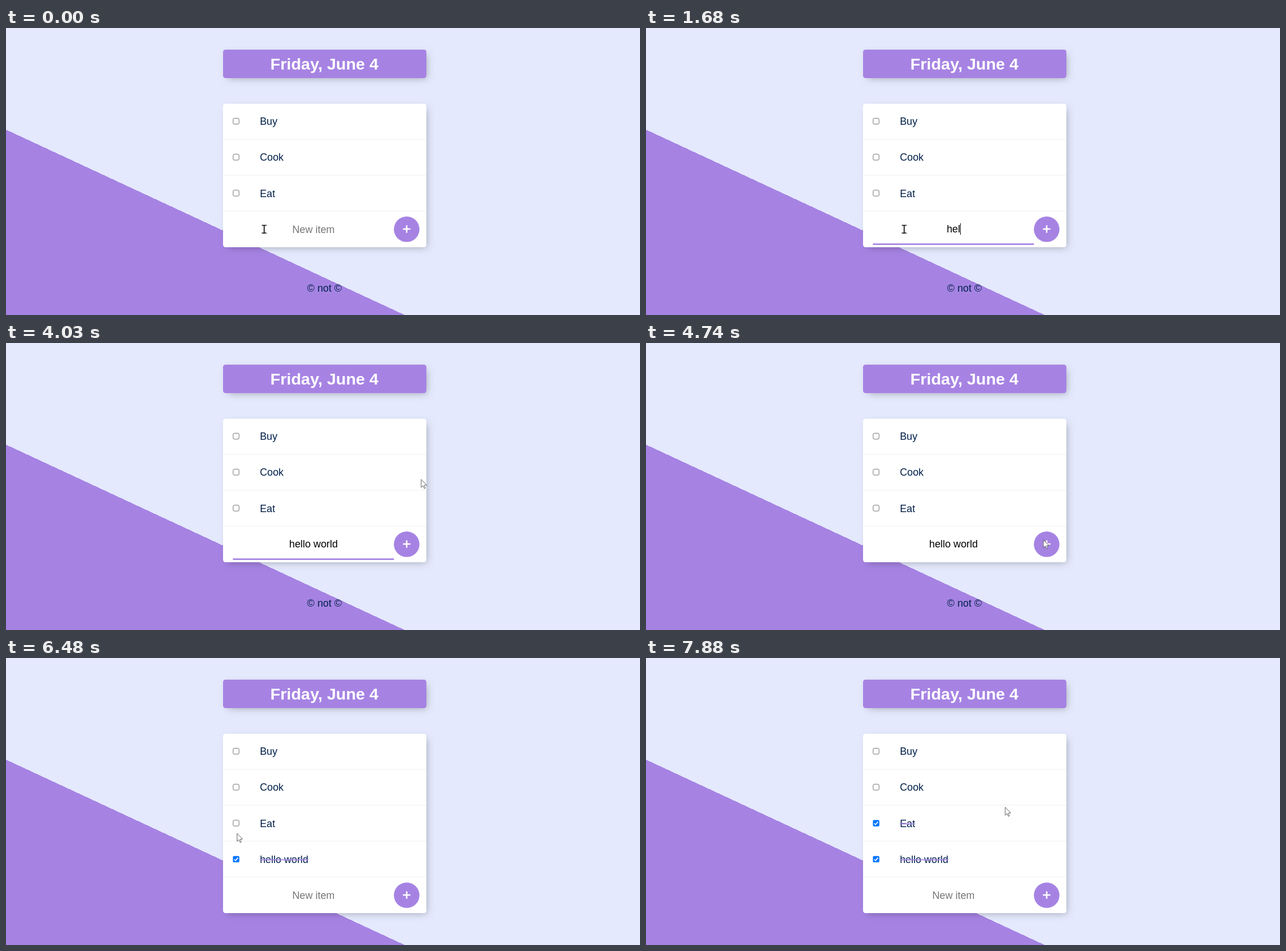
Animation, 1110 px wide and 504 px high, one loop 8.47 s. Source, as an HTML page with a canvas:

```html
<!DOCTYPE html>
<html lang="en">
<head>
<meta charset="utf-8">
<title>To-do list</title>
<style>
html, body { margin: 0; width: 100%; height: 100%; overflow: hidden; background: #e4e9fd; }
canvas { display: block; }
</style>
</head>
<body>
<canvas id="stage" width="1110" height="504"></canvas>
<script>
const ctx = document.getElementById('stage').getContext('2d');
const LOOP = 8470;
const PURPLE = '#a683e3', PALE = '#e4e9fd', NAVY = '#00204a';
const FONT = '"Liberation Sans", Arial, sans-serif';
const BOX = { x: 380, w: 356, top: 133 };
const INPUT_X = 538.3;

// Mouse button: pressed from `down` until `up`.
const CLICK = {
  input: { down: 460, up: 600 },
  add: { down: 4660, up: 4740 },
  hello: { down: 6140, up: 6300 },
  eat: { down: 6960, up: 7080 }
};
const SUBMIT = CLICK.add.up + 120;
const PHRASE = 'hello world';
const BURSTS = [
  { start: 1410, gap: 135, count: 3 },
  { start: 2270, gap: 145, count: 8 }
];
const ITEMS = [
  { text: 'Buy', done: Infinity },
  { text: 'Cook', done: Infinity },
  { text: 'Eat', done: CLICK.eat.up },
  { text: PHRASE, done: CLICK.hello.up }
];

// Each move eases out from the previous stop along a curve bent towards `via`.
const REST = [452, 353];
const MOVES = [
  { start: 3790, end: 4510, via: [855, 127], to: [695.5, 345] },
  { start: 4870, end: 5420, via: [570, 140], to: [460.5, 273.5] },
  { start: 5420, end: 5750, via: [430, 270], to: [403, 348] },
  { start: 6300, end: 6710, via: [408, 318.5], to: [401, 289] },
  { start: 7410, end: 7880, via: [520, 186], to: [628.5, 261.5] }
];

const baseline = i => Math.round(170.25 + 63.15 * i);
const rowY = i => 163.8 + 63.15 * i;

function pointerAt(t) {
  const n = MOVES.findLastIndex(m => t >= m.start);
  if (n < 0) return { x: REST[0], y: REST[1] };
  const { start, end, via, to } = MOVES[n];
  const from = n ? MOVES[n - 1].to : REST;
  const rest = (1 - Math.min(1, (t - start) / (end - start))) ** 2;
  const u = 1 - rest;
  const axis = k => rest * rest * from[k] + 2 * u * rest * via[k] + u * u * to[k];
  return { x: axis(0), y: axis(1) };
}

function typing(t) {
  let count = 0, last = CLICK.input.up;
  for (const b of BURSTS) {
    if (t < b.start) break;
    const n = Math.min(b.count, 1 + Math.floor((t - b.start) / b.gap));
    count += n;
    last = b.start + (n - 1) * b.gap;
  }
  return { text: t < SUBMIT ? PHRASE.slice(0, count) : '', caret: (t - last) % 1000 < 500 };
}

function rounded(x, y, w, h, r) {
  ctx.beginPath();
  ctx.roundRect(x, y, w, h, r);
}

function disc(x, y, r, color) {
  ctx.fillStyle = color;
  ctx.beginPath();
  ctx.arc(x, y, r, 0, 2 * Math.PI);
  ctx.fill();
}

function rect(x, y, w, h, color) {
  ctx.fillStyle = color;
  ctx.fillRect(x, y, w, h);
}

function polyline(points) {
  ctx.beginPath();
  points.forEach(([x, y]) => ctx.lineTo(x, y));
}

function label(text, x, y, color, align = 'left', size = 17.8, weight = 'normal') {
  ctx.font = `${weight} ${size}px ${FONT}`;
  ctx.textAlign = align;
  ctx.fillStyle = color;
  ctx.fillText(text, x, y);
}

function panel(y, h, color) {
  const inset = 4.45;
  ctx.save();
  ctx.shadowColor = 'rgba(0,0,0,0.3)';
  ctx.shadowBlur = 13.35;
  ctx.shadowOffsetX = ctx.shadowOffsetY = inset;
  ctx.fillStyle = '#000';
  rounded(BOX.x + inset, y + inset, BOX.w - 2 * inset, h - 2 * inset, 1);
  ctx.fill();
  ctx.restore();
  ctx.fillStyle = color;
  rounded(BOX.x, y, BOX.w, h, inset);
  ctx.fill();
}

function background() {
  // Hard diagonal edge through (0, 178.5), falling at 25 degrees.
  const angle = 65 * Math.PI / 180;
  const nx = 700 * Math.cos(angle), ny = -700 * Math.sin(angle);
  const fill = ctx.createLinearGradient(-nx, 178.5 - ny, nx, 178.5 + ny);
  fill.addColorStop(0.5, PURPLE);
  fill.addColorStop(0.5, PALE);
  rect(0, 0, 1110, 504, fill);
}

function checkbox(y, checked, hover) {
  const x = 397.3, top = y - 5.6;
  if (!checked) {
    ctx.strokeStyle = hover ? '#4f4f4f' : '#767676';
    ctx.lineWidth = 1;
    rounded(x + 0.4, top + 0.3, 10.3, 10.3, 2);
    ctx.stroke();
    return;
  }
  ctx.fillStyle = hover ? '#005cc8' : '#0075ff';
  rounded(x, top, 11.2, 11.2, 1.9);
  ctx.fill();
  ctx.strokeStyle = '#fff';
  ctx.lineWidth = 1.6;
  polyline([[x + 2.2, top + 5.8], [x + 4.5, top + 8.1], [x + 9, top + 3]]);
  ctx.stroke();
}

function item({ text, done }, i, t, pointer) {
  const y = rowY(i), base = baseline(i);
  const hover = Math.hypot(pointer.x - 403, pointer.y - y) < 7;
  checkbox(y, t >= done, hover);
  label(text, 444.4, base, NAVY);
  if (t >= done + 60) rect(444.4, base - 6.6, ctx.measureText(text).width, 1.8, PURPLE);
  rect(BOX.x, Math.floor(195.3 + i * 63.2), BOX.w, 1, '#f1f1f1');
}

function entry(i, t) {
  const { text, caret } = typing(t);
  const base = baseline(i) - (text ? 1 : 0);
  label(text || 'New item', INPUT_X, base, text ? '#000' : '#757575', 'center');
  if (t >= CLICK.input.up && t < CLICK.add.up) {
    rect(397.3, 378.3, 281.9, 2.7, PURPLE);
    if (caret) rect(Math.floor(INPUT_X + ctx.measureText(text).width / 2), base - 16, 1, 20, '#000');
  }
  const y = rowY(i) + 0.2;
  disc(701.5, y, 22.4, PURPLE);
  rect(695, y - 1.7, 13, 2.5, '#fff');
  rect(700.25, y - 6.9, 2.5, 13, '#fff');
}

function drawPointer({ x, y }, pressed) {
  if (pressed) disc(x, y, 11, 'rgba(255,255,0,0.47)');
  ctx.save();
  ctx.translate(x, y);
  const overInput = y > 326 && x > 420 && x < 679;
  if (overInput) {
    rect(-0.8, -7, 1.6, 14.5, '#000');
    rect(-4.2, -7.2, 8.4, 1.4, '#000');
    rect(-4.2, 6.4, 8.4, 1.4, '#000');
  } else {
    polyline([[0.4, 0.6], [0.4, 14.6], [3.6, 11.6], [5.8, 16.6], [7.8, 15.7], [5.7, 10.9], [10, 10.7]]);
    ctx.closePath();
    ctx.fillStyle = '#fff';
    ctx.fill();
    ctx.strokeStyle = '#3a3a42';
    ctx.lineWidth = 0.8;
    ctx.stroke();
  }
  ctx.restore();
}

function draw(t) {
  const pointer = pointerAt(t);
  const pressed = Object.values(CLICK).some(c => t >= c.down && t < c.up);
  const items = ITEMS.slice(0, t < SUBMIT ? 3 : 4);

  background();
  panel(38, 50, PURPLE);
  label('Friday, June 4', 557.5, 72.5, '#fff', 'center', 28.48, 'bold');
  panel(BOX.top, 63 * (items.length + 1), '#fff');
  items.forEach((it, i) => item(it, i, t, pointer));
  entry(items.length, t);
  if (t < SUBMIT) label('© not ©', 557.5, 463, NAVY, 'center');
  drawPointer(pointer, pressed);
}

const began = performance.now();
function tick() {
  draw((performance.now() - began) % LOOP);
  requestAnimationFrame(tick);
}
tick();
</script>
</body>
</html>
```
